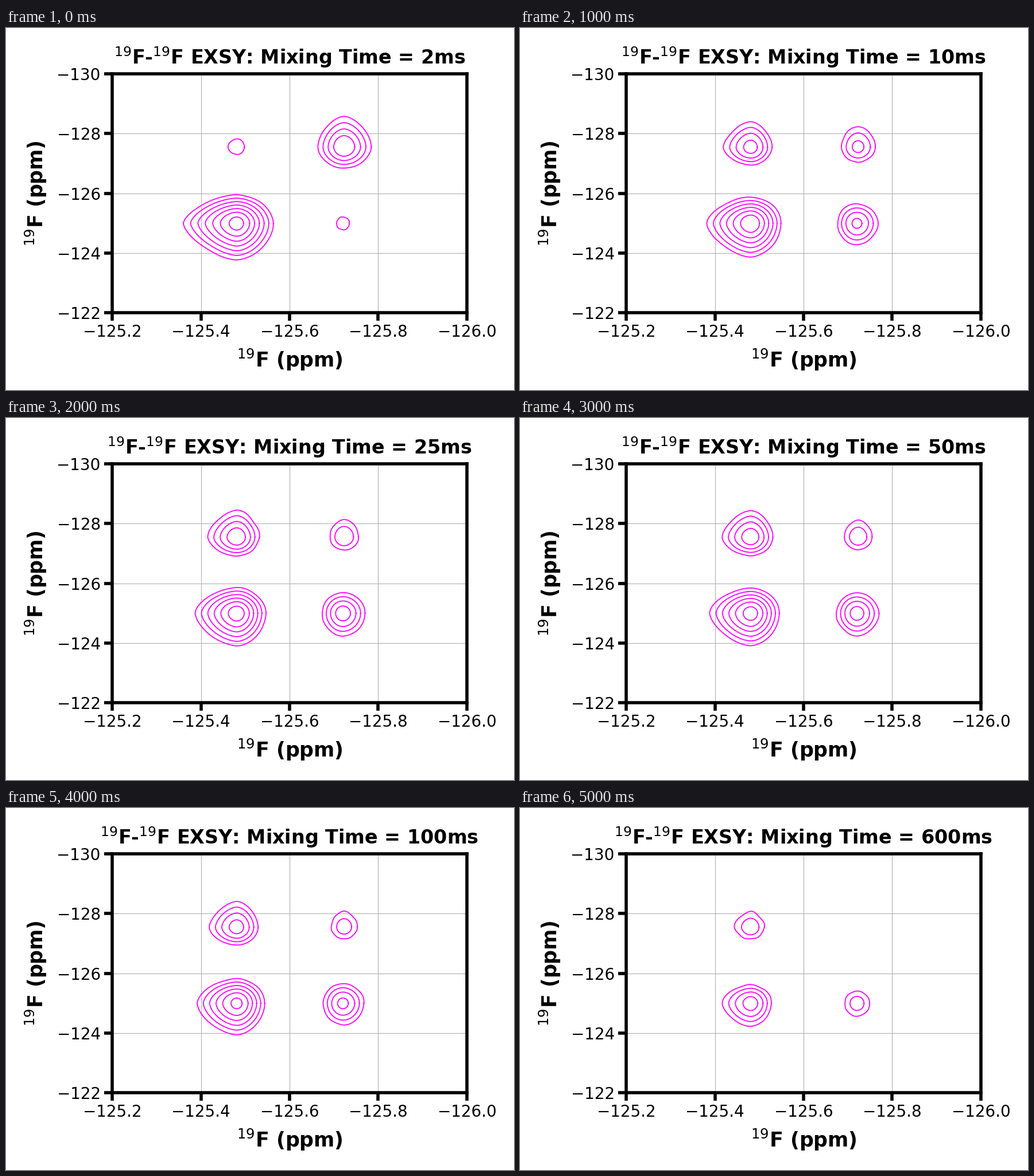
A matplotlib script for the animation above (5500 ms loop, 885x632 px).

```python
import numpy as np
import matplotlib.pyplot as plt
from matplotlib.animation import FuncAnimation

W, H, DPI = 885, 632, 100
LEFT, RIGHT, TOP, BOTTOM = 185, 803, 79.8, 497.3
TIMES = [2, 5, 10, 15, 25, 35, 50, 75, 100, 200, 600]

EXCHANGE = 0.22    # exchange rate per ms
DECAY = 0.0036     # relaxation in contour steps per ms
STEP = 0.32        # log ratio between neighbouring contour levels
CORE = 12          # radius near the summit in px
THETA = np.linspace(0, 2 * np.pi, 241)

# center, equilibrium height in contour steps, excess before exchange,
# reach gained per step to the right, top, left and bottom
PEAKS = [
    ((402, 341), 5.62, 0.45, (7.0, 5.9, 10.9, 8.2)),
    ((589, 207.5), 1.88, 1.43, (7.8, 10.5, 7.4, 6.5)),
    ((402, 208), 3.80, -1, (7.4, 9.6, 10.5, 5.7)),
    ((587, 341), 3.62, -1, (7.6, 6.9, 6.9, 7.9)),
]

plt.rcParams["font.family"] = "DejaVu Sans"


def outline(u, slopes):
    """Contour radii, u steps below the summit.

    Each quadrant is a superellipse, sharper where the tails are longer.
    """
    reach = (CORE + slopes * u) * np.tanh(1.6 * np.sqrt(u))
    quad = (THETA // (np.pi / 2)).astype(int) % 4
    a, b = reach[quad], reach[(quad + 1) % 4]
    p = np.maximum(1.2, 2 - 0.9 * ((a + b) / (2 * reach.min()) - 1))
    phi = THETA % (np.pi / 2)
    return ((np.cos(phi) / a) ** p + (np.sin(phi) / b) ** p) ** (-1 / p)


def ripple(rng):
    """Faint irregularity of the lowest contours."""
    return sum(rng.normal(0, 0.25) * np.cos(k * THETA + rng.uniform(0, 2 * np.pi))
               for k in range(3, 8))


def contours(i):
    """All contours at mixing time i as one line broken by NaNs."""
    rng = np.random.default_rng(40 + i)
    t = TIMES[i]
    mixing = np.exp(-EXCHANGE * t)
    xs, ys = [], []
    for (cx, cy), height, excess, slopes in PEAKS:
        depth = height + np.log(1 + excess * mixing) / STEP - DECAY * t
        slopes = np.array(slopes)
        if excess > 0:
            slopes[[0, 2]] *= 1 + 0.25 * mixing
        noise = ripple(rng)
        for u in np.arange(depth, 0, -1):
            r = outline(u, slopes) + noise * (u / depth) ** 6
            xs += [cx + r * np.cos(THETA), [np.nan]]
            ys += [H - cy + r * np.sin(THETA), [np.nan]]
    return np.concatenate(xs), np.concatenate(ys)


def tick_labels(values, digits):
    return [f"{v:.{digits}f}".replace("-", "\u2212") for v in values]


fig = plt.figure(figsize=(W / DPI, H / DPI), dpi=DPI, facecolor="white")
ax = fig.add_axes([LEFT / W, 1 - BOTTOM / H, (RIGHT - LEFT) / W, (BOTTOM - TOP) / H])
ax.set_xlim(-125.2, -126.0)
ax.set_ylim(-122, -130)
xt, yt = np.linspace(-125.2, -126, 5), np.linspace(-122, -130, 5)
ax.set_xticks(xt, tick_labels(xt, 1))
ax.set_yticks(yt, tick_labels(yt, 0))
ax.tick_params(labelsize=20, length=10, width=4, pad=4.5)
ax.grid(True, color="#b0b0b0", linewidth=0.8)
for spine in ax.spines.values():
    spine.set_linewidth(4)


def label(x, y, s="", size=25, **kw):
    return fig.text(x, H - y, s, transform=None, fontsize=size, weight="bold",
                    ha="center", va="baseline", **kw)


MID_X, MID_Y = (LEFT + RIGHT) / 2, (TOP + BOTTOM) / 2
title = label(MID_X, 63, size=24)
label(MID_X, 592, r"$^{19}$F (ppm)")
label(65, MID_Y, r"$^{19}$F (ppm)", rotation=90, rotation_mode="anchor")
line, = ax.plot([], [], color="magenta", linewidth=1.3, transform=None)


def draw(i):
    line.set_data(*contours(i))
    title.set_text(rf"$^{{19}}$F-$^{{19}}$F EXSY: Mixing Time = {TIMES[i]}ms")
    return line, title


anim = FuncAnimation(fig, draw, frames=len(TIMES), interval=500,
                     repeat=True, repeat_delay=0, blit=False)
plt.show()
```
